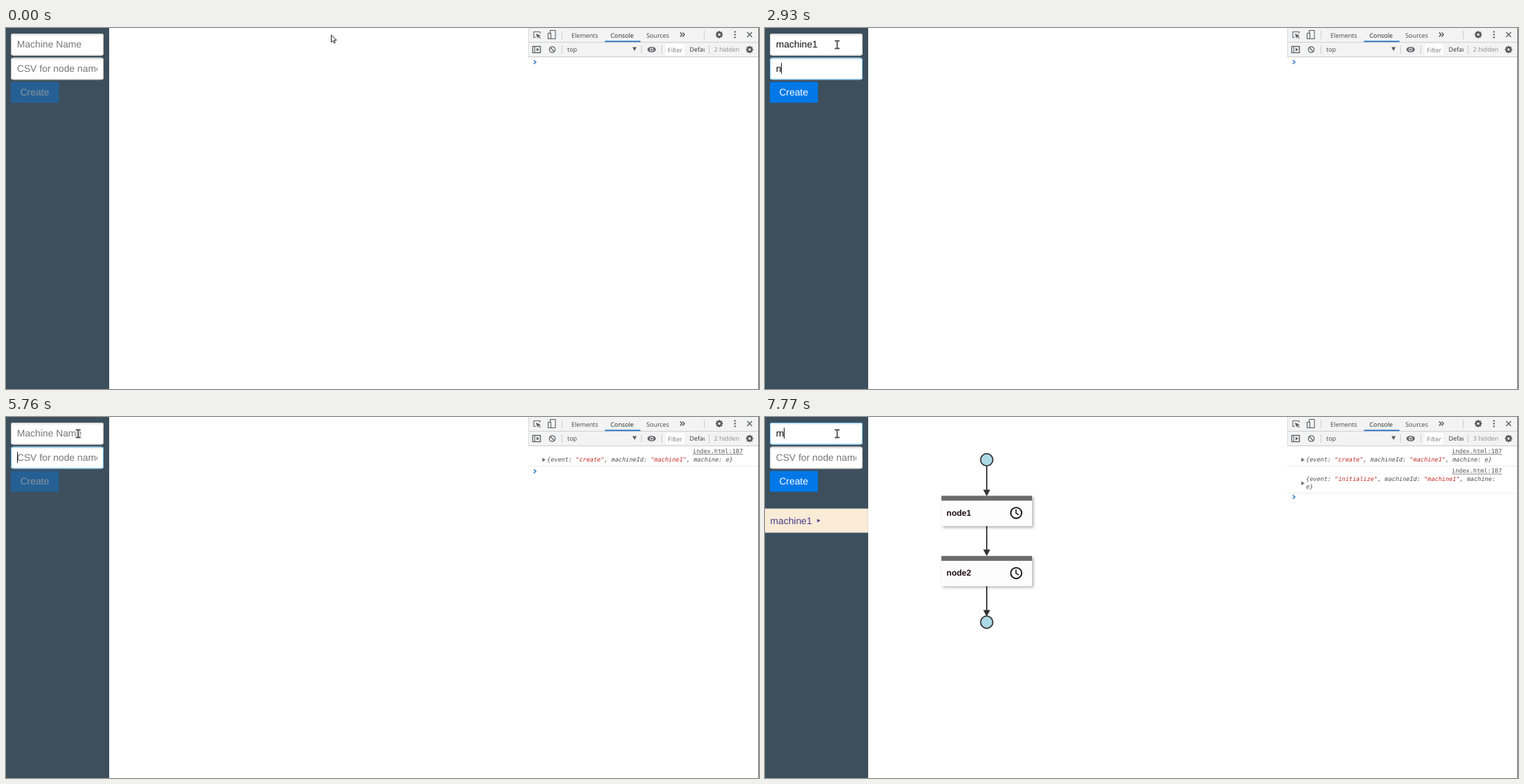
Animation, 1080 px wide and 519 px high, one loop 8 s. Source, as an HTML page with a canvas:

```html
<!DOCTYPE html>
<html lang="en">
<head>
<meta charset="utf-8">
<title>State machine builder</title>
<style>
html, body { margin: 0; height: 100%; overflow: hidden; background: #fff; }
canvas { display: block; }
</style>
</head>
<body>
<canvas id="stage" width="1080" height="519"></canvas>
<script>
const g = document.getElementById('stage').getContext('2d');
const SANS = '13.8px "Liberation Sans", Arial, sans-serif';
const BOLD = 'bold 12px "Liberation Sans", Arial, sans-serif';
const TOOL = '8.9px "Open Sans", "Noto Sans", sans-serif';
const MONO = '8.53px "DejaVu Sans Mono", monospace';
const LOOP = 8000;

const NAME_KEYS = [1310, 1390, 1460, 1540, 1540, 1690, 1770, 2000];
const NODE_KEYS = [2930, 3000, 3080, 3160, 3310, 3480, 3800, 3880, 3960, 4040, 4340];
const CARET_ON = [[540, 1080], [1310, 4890], [5430, 6210], [6530, 7060], [7460, LOOP]];
const SUBMIT = 5670, FIRST_LOG = 5760, BUILT = 6050;

const typed = (word, keys, t) => word.slice(0, keys.filter(k => k <= t).length);

function rect(x, y, w, h, color) {
  g.fillStyle = color;
  g.fillRect(x, y, w, h);
}
function text(str, x, y, font, color) {
  g.font = font;
  g.fillStyle = color;
  g.fillText(str, x, y);
  return x + g.measureText(str).width;
}
function line(points, color, width = 1, fill) {
  g.beginPath();
  points.forEach(([x, y], i) => i ? g.lineTo(x, y) : g.moveTo(x, y));
  if (fill) { g.closePath(); g.fillStyle = fill; g.fill(); }
  if (color) { g.strokeStyle = color; g.lineWidth = width; g.stroke(); }
}
function circle(x, y, r, fill, stroke, width) {
  g.beginPath();
  g.arc(x, y, r, 0, 7);
  if (fill) { g.fillStyle = fill; g.fill(); }
  if (stroke) { g.strokeStyle = stroke; g.lineWidth = width; g.stroke(); }
}
function rounded(x, y, w, h, r, fill, stroke) {
  g.beginPath();
  g.roundRect(x, y, w, h, r);
  if (fill) { g.fillStyle = fill; g.fill(); }
  if (stroke) { g.strokeStyle = stroke; g.lineWidth = 1; g.stroke(); }
}

function field(y, value, hint, focused, caret, misspelt) {
  rounded(7, y, 133, 31.5, 3.5, '#fff');
  const shade = g.createLinearGradient(0, y, 0, y + 4);
  shade.addColorStop(0, '#ddd');
  shade.addColorStop(1, '#fff');
  rounded(7, y, 133, 31.5, 3.5, shade);
  rounded(7.5, y + .5, 132, 30.5, 3, null, focused ? '#6cc0ee' : '#ccc');
  g.save();
  g.beginPath();
  g.rect(15, y, 116, 32);
  g.clip();
  const end = text(value || hint, 15.7, y + 20, SANS, value ? '#111' : '#777');
  if (misspelt) {
    const wave = [];
    for (let x = 16; x <= end; x++) if (x < 54 || x > 57) wave.push([x, y + 21.8 + (x % 4 < 2 ? -.5 : .5)]);
    line(wave, '#e03030', 1.1);
  }
  if (focused && caret) rect(value ? Math.round(end - .6) : 16, y + 7.5, 1, 15.5, '#111');
  g.restore();
}

function button(enabled) {
  g.globalAlpha = enabled ? 1 : .4;
  rounded(7, 77.5, 69, 30, 1.8, '#0078e7');
  g.globalAlpha = 1;
  text('Create', 20.4, 97, SANS, enabled ? '#fff' : '#8b959e');
}

function gear(x, y) {
  for (let i = 0; i < 4; i++) {
    const a = i * Math.PI / 4, c = 5.2 * Math.cos(a), s = 5.2 * Math.sin(a);
    line([[x - c, y - s], [x + c, y + s]], '#5a5a5a', 2.2);
  }
  circle(x, y, 3, '#f3f3f3', '#5a5a5a', 2.4);
}

function toolbar(hidden) {
  const ink = '#5f6368';
  rect(749, 0, 330, 41, '#f3f3f3');
  rect(749, 20, 330, 1, '#d0d0d0');
  rect(749, 41, 330, 1, '#ccc');
  rect(749, 0, 1, 41, '#ddd');
  [[797, 4], [797, 25], [911, 25], [940, 25], [1001, 4], [1008, 25]].forEach(([x, y]) => rect(x, y, 1, 12, '#ccc'));

  line([[760, 13.5], [757, 13.5], [757, 5.5], [766, 5.5], [766, 8]], ink, 1.1);
  line([[760, 8], [767, 11], [764.4, 11.9], [767, 14.4], [766, 15.3], [763.4, 12.8], [762.3, 15]], null, 1, ink);
  g.strokeStyle = ink;
  g.lineWidth = 1.1;
  g.strokeRect(780.5, 3.5, 7.5, 12);
  rect(776, 7, 6, 9, '#f3f3f3');
  g.strokeRect(777.5, 7.5, 4, 8);

  text('Elements', 811, 13.6, TOOL, '#444');
  text('Console', 867, 13.6, TOOL, '#222');
  text('Sources', 918.5, 13.6, TOOL, '#444');
  rect(859, 18.4, 51, 1.8, '#2873c0');
  [967, 970.5].forEach(x => line([[x, 6.5], [x + 2.7, 9.5], [x, 12.5]], '#444', 1.2));
  gear(1023, 9.5);
  [5.5, 9.5, 13.5].forEach(y => circle(1045.5, y, 1.2, ink));
  line([[1063, 6], [1070, 13]], ink, 1.4);
  line([[1070, 6], [1063, 13]], ink, 1.4);

  g.strokeRect(755.5, 26.5, 11, 9);
  line([[758.5, 26.5], [758.5, 35.5]], ink);
  line([[761, 28.5], [765, 31], [761, 33.5]], null, 1, ink);
  circle(783.5, 31, 4.2, null, ink, 1.3);
  line([[780.6, 28], [786.4, 34]], ink, 1.3);
  text('top', 805, 34.4, TOOL, '#444');
  line([[898.5, 27.5], [904.5, 27.5], [901.5, 33]], null, 1, '#5a5a5a');
  g.beginPath();
  g.ellipse(926, 31, 6, 4, 0, 0, 7);
  g.fillStyle = ink;
  g.fill();
  circle(926, 31, 2.1, ink, '#f3f3f3', 1.1);
  rect(946, 23, 27, 16, '#fff');
  text('Filter', 949.3, 35, TOOL, '#777');
  g.save();
  g.beginPath();
  g.rect(978, 22, 24, 18);
  g.clip();
  text('Default', 980.5, 34.4, TOOL, '#333');
  g.restore();
  text(hidden + ' hidden', 1015.5, 34.4, TOOL, '#8a8a8a');
  gear(1066.5, 31);
}

function logEntry(y, event, wraps) {
  text('index.html:187', 985, y, MONO, '#555');
  rect(985, y + 1.3, 72, .8, '#666');
  const mid = y + (wraps ? 15 : 9.5);
  line([[769.3, mid - 3], [773.8, mid], [769.3, mid + 3]], null, 1, '#6e6e6e');
  let x = 776;
  [['{event: '], [`"${event}"`, 1], [', machineId: '], ['"machine1"', 1], [wraps ? ', machine:' : ', machine: e}']]
    .forEach(([str, quoted]) => x = text(str, x, y + 12, 'italic ' + MONO, quoted ? '#c0261f' : '#4a4a4a'));
  if (wraps) text('e}', 776, y + 23, 'italic ' + MONO, '#4a4a4a');
  rect(749, y + (wraps ? 29 : 18), 330, 1, '#ececec');
}

function prompt(y) {
  line([[757, y - 2.8], [760, y], [757, y + 2.8]], '#2f70c8', 1.5);
}

function arrow(y, tip) {
  line([[318, y], [318, tip - 8]], '#333', 1.8);
  line([[313, tip - 9.5], [323, tip - 9.5], [318, tip]], null, 1, '#333');
}

function node(y, label) {
  g.save();
  g.shadowColor = 'rgba(0,0,0,.3)';
  g.shadowBlur = 4;
  g.shadowOffsetX = g.shadowOffsetY = 1.8;
  rect(253, y, 130, 43.5, '#fcfcfc');
  g.restore();
  rect(253, y, 130, 7, '#6b6b6b');
  text(label, 260.3, y + 28.6, BOLD, '#1c0b10');
  circle(360.3, y + 24.6, 7.8, null, '#111', 1.9);
  line([[360, y + 19.5], [360, y + 25], [364, y + 27.4]], '#111', 1.5);
}

function diagram() {
  arrow(71, 114);
  arrow(156, 200);
  arrow(243, 287);
  [61.5, 295].forEach(y => circle(318, y, 8.8, '#add8e6', '#333', 1.8));
  node(113.3, 'node1');
  node(199.8, 'node2');
}

function listItem() {
  rect(0, 131.5, 148, 35, '#ccc');
  rect(0, 132.3, 147.5, 33.4, '#faebd7');
  text('machine1', 7.6, 153.6, SANS, '#483d8b');
  line([[74.8, 146.6], [79.4, 149], [74.8, 151.4]], null, 1, '#483d8b');
}

function pointer(x, y) {
  line([[0, 0], [0, 10.5], [2.5, 8.3], [4.2, 11.7], [5.8, 11], [4.2, 7.5], [7.6, 7.5]]
    .map(([dx, dy]) => [x + .5 + dx, y + dy]).concat([[x + .5, y]]), '#222', 1, '#fff');
}
function textCursor(x, y) {
  [[3, '#fff', 3.2], [0, '#444', 1.7]].forEach(([, color, width]) => {
    line([[x - 3.5, y - 5.5], [x + 3.5, y - 5.5]], color, width);
    line([[x - 3.5, y + 5.5], [x + 3.5, y + 5.5]], color, width);
    line([[x, y - 5.5], [x, y + 5.5]], color, width);
  });
}
function mouse(t) {
  if (t < 70) pointer(466, 10);
  else if (t < 150) pointer(330, 18);
  else if (t < 320) pointer(184, 26);
  else textCursor(t < 390 ? 118 : 103.5, 24);
}

function draw(t) {
  const sent = t >= SUBMIT, built = t >= BUILT;
  const name = sent ? (t >= 7770 ? 'm' : '') : typed('machine1', NAME_KEYS, t);
  const nodes = sent ? (t >= 6530 && t < 7230 ? 'm' : '') : typed('node1,node2', NODE_KEYS, t);
  const focus = t < 540 ? -1 : t < 2380 || t >= 7460 ? 0 : 1;
  const caret = CARET_ON.some(([from, to]) => t >= from && t < to);

  rect(0, 0, 1080, 519, '#fff');
  rect(0, 0, 148, 519, '#3d4f5d');
  field(8, name, 'Machine Name', focus === 0, caret);
  field(42.7, nodes, 'CSV for node names', focus === 1, caret, t >= 5350 && !sent);
  button(name);
  if (built) { listItem(); diagram(); }

  toolbar(built ? 3 : 2);
  if (t >= FIRST_LOG) logEntry(52, 'create');
  if (built) logEntry(80.3, 'initialize', true);
  prompt(built ? 115 : t >= FIRST_LOG ? 78 : 49);
  rect(1079, 0, 1, 519, '#666');
  mouse(t);
}

g.textRendering = 'geometricPrecision';
function tick() {
  draw(performance.now() % LOOP);
  requestAnimationFrame(tick);
}
tick();
</script>
</body>
</html>
```
